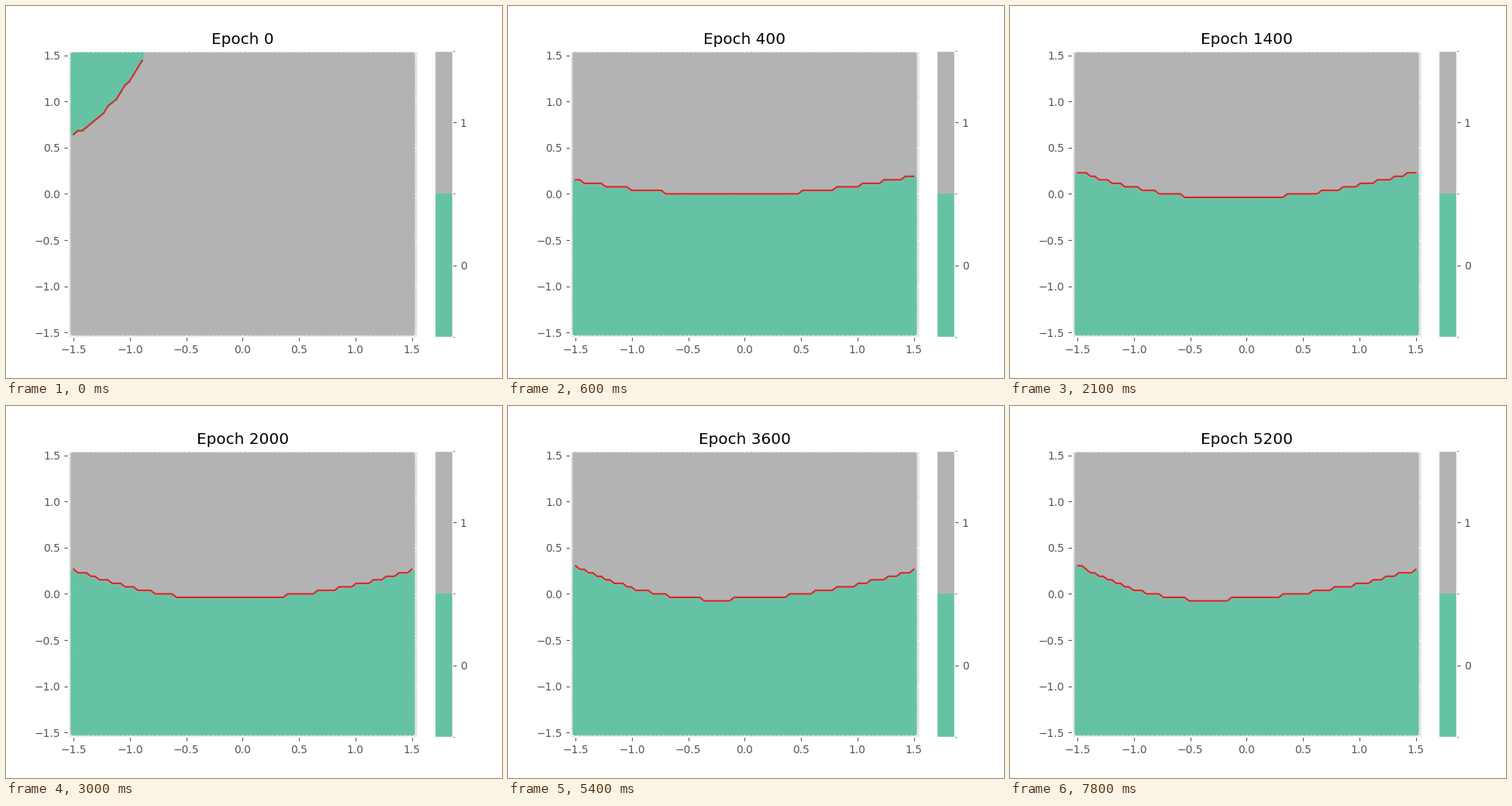
These frames come from a looping animation (640x480 px, 8000 ms). A matplotlib script:

```python
import numpy as np
import matplotlib.pyplot as plt
from matplotlib.animation import FuncAnimation
from matplotlib.colors import to_rgba_array

WIDTH, HEIGHT, DPI = 640, 480, 100
GREEN, GRAY, RED = "#66c2a5", "#b3b3b3", "#d62728"
N = 80
STEP = 3 / (N - 1)
STEP_MS, TICK_MS, LOOP_MS = 300, 100, 8000
EPOCHS_PER_STEP, LAST_EPOCH = 200, 5200

columns = np.arange(N)
rows = np.arange(N)[:, None] - N // 2
grid = np.linspace(-1.5, 1.5, N)


def initial_levels():
    """Untrained boundary: a curve cutting off the upper left corner."""
    levels = np.round(16.85 + 0.65 * columns + 0.041 * columns**2)
    return np.where(levels < N // 2, levels, np.nan)


def trained_levels(epoch):
    """Two half parabolas, in grid rows, that deepen as training goes on."""
    decay = EPOCHS_PER_STEP / epoch
    bottom = -2 + 2.7 * decay**0.63
    left_top = 13.1 - 11 * decay**0.25
    right_top = 7 - 3.5 * decay**0.9
    center = 36 - 7 * (epoch / LAST_EPOCH)**2

    offset = columns - center
    top = np.where(offset < 0, left_top, right_top)
    span = np.where(offset < 0, center, N - 1 - center)
    return np.round(bottom + (top - bottom) * (offset / span)**2)


plt.rcParams.update({
    "font.family": "DejaVu Sans", "font.size": 10,
    "axes.facecolor": "#e5e5e5", "axes.edgecolor": "white",
    "axes.linewidth": 1, "axes.axisbelow": True, "axes.titlesize": 14.4,
    "grid.color": "white", "xtick.color": "#555555", "ytick.color": "#555555",
})

fig = plt.figure(figsize=(WIDTH / DPI, HEIGHT / DPI), dpi=DPI,
                 facecolor="white")


def add_axes(left, right):
    return fig.add_axes([left / WIDTH, 0.11, (right - left) / WIDTH, 0.77])


ax = add_axes(80, 530.9)
ax.set(xlim=(-1.55, 1.55), ylim=(-1.55, 1.55))
ax.grid(True)
title = ax.set_title("Epoch 0", color="black")

xx, yy = np.meshgrid(grid, grid)
dots = ax.scatter(xx.ravel(), yy.ravel(), s=36, linewidths=0, color=GRAY)
boundary, = ax.plot([], [], color=RED, lw=1.5)

bar = add_axes(553.2, 576)
bar.axhspan(0, 1, color=GREEN, lw=0)
bar.axhspan(1, 2, color=GRAY, lw=0)
bar.set(xlim=(0, 1), ylim=(0, 2), xticks=[])
bar.yaxis.tick_right()
bar.set_yticks([0.5, 1.5], ["0", "1"])
bar.set_yticks([0, 1, 2], minor=True)

class_colors = to_rgba_array([GRAY, GREEN])


def update(frame):
    epoch = EPOCHS_PER_STEP * (frame * TICK_MS // STEP_MS)
    if epoch == 0:
        levels = initial_levels()
        is_green = rows >= levels
    else:
        levels = trained_levels(epoch)
        is_green = rows < levels
    dots.set_facecolors(class_colors[is_green.astype(int).ravel()])
    boundary.set_data(grid, levels * STEP)
    title.set_text(f"Epoch {epoch}")
    return dots, boundary, title


animation = FuncAnimation(fig, update, frames=LOOP_MS // TICK_MS,
                          interval=TICK_MS, repeat=True, repeat_delay=0)
plt.show()
```
